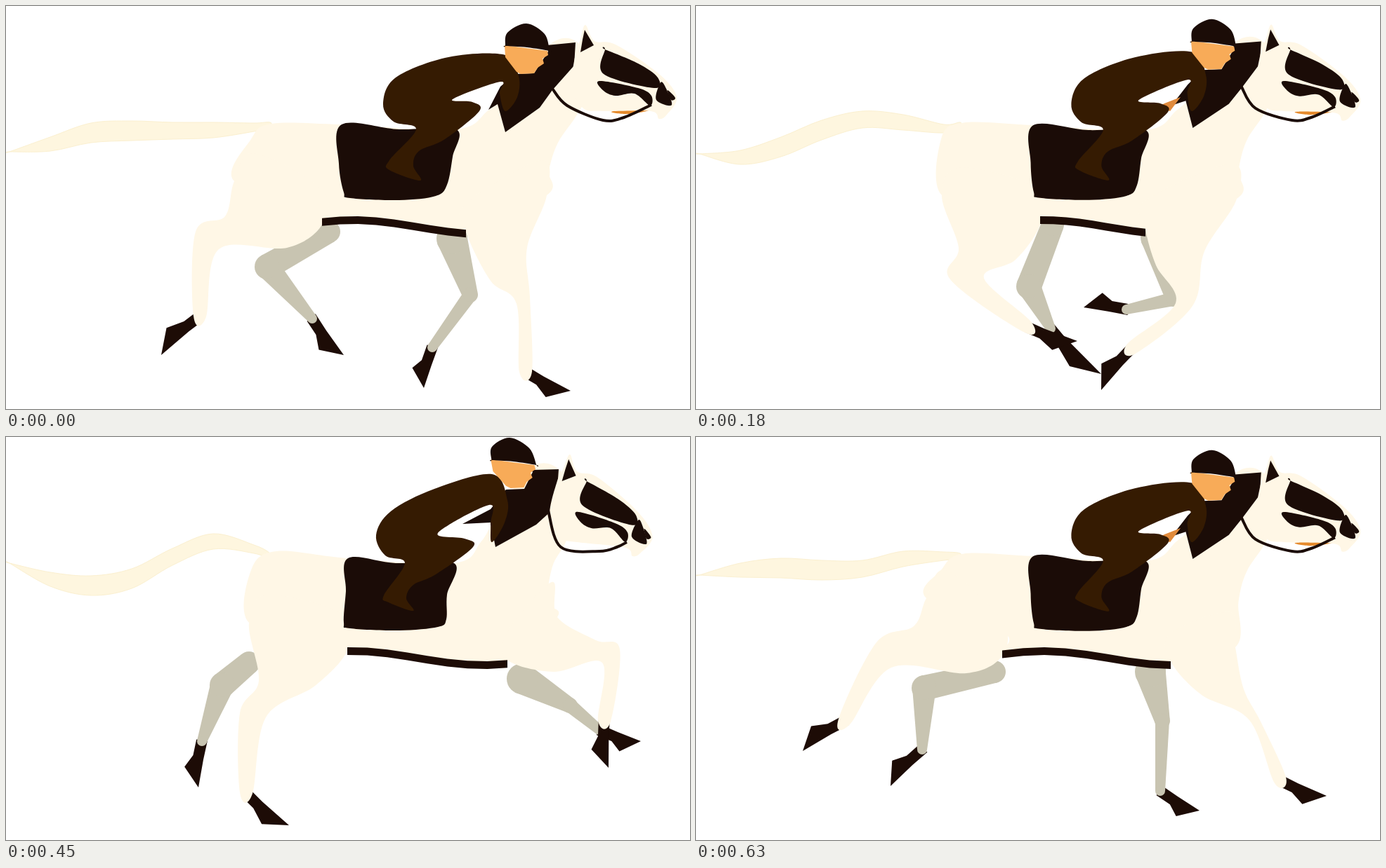
These frames come from a looping animation (974 px wide and 575 px high, 720 ms). An HTML page with a canvas:

```html
<!DOCTYPE html>
<html lang="en">
<head>
<meta charset="utf-8">
<title>Galloping horse</title>
<style>
html, body { margin: 0; width: 100%; height: 100%; overflow: hidden; background: #fff; }
canvas { display: block; width: 974px; height: 575px; }
</style>
</head>
<body>
<canvas id="stage" width="974" height="575"></canvas>
<script>
const ctx = document.getElementById('stage').getContext('2d');
const CREAM = '#fff7e6', PALE = '#fef6df', EDGE = '#fbf0d0', GREY = '#c8c4b1';
const DARK = '#1d0c06', BROWN = '#351b02', SKIN = '#f8ab58', BLACK = '#1b0c07';

const pts = s => s.trim().split(/\s+/).map(p => p.split(',').map(Number));
const mix = (a, b, k) => a.map((p, i) => p.map((v, j) => v + (b[i][j] - v) * k));

// Gait: eight steps through six key poses; lift is how far the rider has risen
const STEP = 90;
const GAIT = [0, .5, 1, 2, 2.5, 3, 4, 5];
const LIFT = [0, 0, .26, .64, 1, 1, .64, .26];

// Near legs: front edge down to the knee, fetlock, back edge up, then the toe
const nearHind = [
  '450,312 400,345 303,347 276,443 270,322 312,300 325,250 221,498',
  '490,312 455,362 410,388 472,458 362,390 374,345 350,270 543,478',
  '522,305 500,358 483,405 521,499 441,400 430,342 360,288 586,544',
  '486,305 440,355 370,400 342,508 333,394 360,348 346,265 403,554',
  '455,310 405,350 303,360 255,447 272,330 322,303 331,258 252,522',
  '436,312 385,337 278,329 211,406 257,293 310,270 328,230 152,448'
].map(pts);
const nearFore = [
  '770,270 742,345 746,415 740,522 727,425 690,392 655,322 804,549',
  '770,275 724,350 707,428 620,489 683,424 655,370 640,318 577,548',
  '773,270 747,350 752,428 643,444 716,415 685,375 658,320 577,444',
  '785,257 840,290 874,303 852,405 849,322 780,335 714,318 858,472',
  '778,290 825,345 862,378 903,422 838,378 755,362 692,320 974,438',
  '768,300 780,360 805,408 832,490 788,404 720,368 676,320 898,512'
].map(pts);

// Far legs: top, knee, fetlock, toe
const farHind = [
  '460,322 372,372 436,446 481,498', '508,312 474,400 505,460 577,525',
  '415,342 405,392 414,499 470,543', '346,322 308,354 279,434 274,500',
  '310,298 280,335 246,398 193,438', '425,335 325,358 322,446 277,498'
].map(pts);
const farFore = [
  '635,332 661,412 607,487 595,545', '655,330 680,418 613,433 552,430',
  '752,325 784,354 728,414 689,416', '735,345 803,383 845,418 904,434',
  '672,338 745,394 771,478 832,494', '647,335 664,405 661,505 717,533'
].map(pts);

// Tail heights from tip to root, at even distances
const tail = [
  [208, 197, 181, 178, 178, 177, 173], [211, 216, 201, 177, 162, 166, 175],
  [201, 218, 212, 183, 156, 155, 171], [180, 203, 212, 202, 171, 149, 160],
  [183, 190, 200, 200, 185, 160, 158], [197, 190, 187, 190, 188, 174, 170]
].map(ys => ys.map((y, i) => [5 + 58 * i, y]));
const TAIL_WIDTH = [0, 10, 14, 14, 12, 11, 6];

// Shapes with a low and a raised form
const back = [
  '378,168 478,169 640,176 688,148 735,110 774,55 811,50 840,100 815,152 786,195 773,235',
  '385,163 487,173 638,180 676,150 700,110 747,44 787,46 815,100 797,150 778,185 771,235'
].map(pts);
const saddle = [
  '478,169 560,176 641,176 636,215 628,255 612,271 560,277 490,274 481,266 474,225',
  '487,173 555,180 638,180 628,225 627,260 615,271 560,276 490,273 481,265 484,220'
].map(pts);
const mane = [
  '770,56 811,52 809,85 778,120 760,145 711,180 700,140 687,148 704,115 725,97 752,96 772,65',
  '748,47 787,46 785,75 777,105 755,125 697,157 690,122 650,124 690,103 712,75 738,74 750,50'
].map(pts);
const torso = [
  '711,70 630,73 555,102 537,140 552,165 584,176 546,220 546,234 590,249 580,228 588,207 625,190 674,150 664,137 636,133 704,108 703,125 711,150 728,130 730,100',
  '692,53 610,74 548,106 527,140 540,169 568,180 538,226 545,236 580,248 570,230 580,211 612,196 665,157 653,145 615,137 688,97 690,125 692,150 710,122 714,90'
].map(pts);
const rein = ['778,118 799,142 850,163 880,159 919,141', '772,105 790,157 845,163 870,157 884,150'].map(pts);

const face = pts('710,56 771,64 772,70 764,75 766,82 757,88 752,96 733,97 727,94 711,73');
const hat = pts('711,57 711,57 714,38 741,25 767,40 774,64 774,64 742,59');
const skull = pts('811,68 818,48 825,27 838,50 868,55 930,97 955,130 941,155 930,161 918,150 850,150 822,146 806,115');
const ear = pts('824,34 837,56 818,66 821,48');
const marks = [
  '853,62 853,62 900,82 928,102 923,117 851,97',
  '845,107 900,117 919,128 917,142 895,125 868,128 851,121',
  '931,111 937,112 948,141 926,134',
  '942,120 953,131 947,134'
].map(pts);

// Smooth curve through the points
function trace(list, closed = true) {
  const n = list.length;
  const at = i => closed ? list[(i + n) % n] : list[Math.max(0, Math.min(n - 1, i))];
  ctx.beginPath();
  ctx.moveTo(...list[0]);
  for (let i = 0; i < (closed ? n : n - 1); i++) {
    const [a, b, c, d] = [at(i - 1), at(i), at(i + 1), at(i + 2)];
    ctx.bezierCurveTo(b[0] + (c[0] - a[0]) / 6, b[1] + (c[1] - a[1]) / 6,
                      c[0] - (d[0] - b[0]) / 6, c[1] - (d[1] - b[1]) / 6, c[0], c[1]);
  }
}

function blob(list, color) {
  trace(list);
  ctx.fillStyle = color;
  ctx.fill();
}

function poly(list, color) {
  ctx.beginPath();
  list.forEach(p => ctx.lineTo(...p));
  ctx.closePath();
  ctx.fillStyle = color;
  ctx.fill();
}

// Unit vector from a to b, and the distance
function aim(a, b) {
  const dx = b[0] - a[0], dy = b[1] - a[1], len = Math.hypot(dx, dy) || 1;
  return [dx / len, dy / len, len];
}

function hoof(ankle, toe) {
  const [ux, uy, dist] = aim(ankle, toe), len = Math.max(58, dist);
  const shape = [[-2, -8], [26, -4], [len, 0], [len * .58, 22], [21, 11], [-2, 8]];
  poly(shape.map(([u, v]) => [ankle[0] + ux * u - uy * v, ankle[1] + uy * u + ux * v]), DARK);
}

function taper(a, b, ra, rb) {
  const [ux, uy] = aim(a, b);
  const side = (p, r) => [p[0] - uy * r, p[1] + ux * r];
  poly([side(a, ra), side(b, rb), side(b, -rb), side(a, -ra)], GREY);
  [[a, ra], [b, rb]].forEach(([p, r]) => {
    ctx.beginPath();
    ctx.arc(...p, r, 0, 7);
    ctx.fill();
  });
}

function farLeg([top, knee, ankle, toe], rTop, rKnee) {
  hoof(ankle, toe);
  taper(top, knee, rTop, rKnee);
  taper(knee, ankle, rKnee - 1, 7);
}

function nearLeg(leg, inFront, inBack) {
  const [top, front, kneeF, ankle, kneeB, rear, end, toe] = leg;
  const [ux, uy] = aim([(kneeF[0] + kneeB[0]) / 2, (kneeF[1] + kneeB[1]) / 2], ankle);
  const turn = -uy * (kneeF[0] - kneeB[0]) + ux * (kneeF[1] - kneeB[1]) > 0 ? 9 : -9;
  const side = s => [ankle[0] - uy * s, ankle[1] + ux * s];
  hoof(ankle, toe);
  blob([[top[0] + inFront, top[1] - 50], top, front, kneeF, side(turn), side(-turn),
        kneeB, rear, end, [end[0] + inBack, end[1] - 40]], CREAM);
}

const belly = x => 310 + 10 * Math.sin((x - 587) / 185 * Math.PI);
function bellyLine(from, to, drop) {
  return Array.from({ length: 9 }, (_, i) => {
    const x = from + (to - from) * i / 8;
    return [x, belly(x) + drop];
  });
}

function drawTail(spine) {
  const edge = s => spine.map(([x, y], i) => [x, y + s * TAIL_WIDTH[i]]);
  blob([...edge(-1), [376, 166], [376, 174], ...edge(1).reverse()], PALE);
  ctx.strokeStyle = EDGE;
  ctx.lineWidth = 1;
  ctx.stroke();
}

function drawHead(k) {
  ctx.save();
  ctx.translate(825 - 22 * k, 27 - 2 * k);
  ctx.rotate(k * 6.5 * Math.PI / 180);
  ctx.translate(-825, -27);
  if (k < .5) blob(pts('862,151 890,147 915,149 885,154'), '#e58a2c');
  blob(skull, CREAM);
  poly(ear, BLACK);
  marks.forEach(m => blob(m, BLACK));
  ctx.restore();
}

function drawRiderHead(k) {
  ctx.save();
  ctx.transform(1, 0, .13 * k, 1, -27 * k, -24 * k);
  poly(face, SKIN);
  blob(hat, BLACK);
  ctx.restore();
}

function draw(step) {
  const g = GAIT[step], k = LIFT[step];
  const pose = table => mix(table[Math.floor(g)], table[Math.ceil(g)], g % 1);
  const hind = pose(nearHind), fore = pose(nearFore);
  const flank = hind[0][0], rump = hind[6], chest = fore[0], elbow = fore[6][0];
  ctx.fillStyle = '#fff';
  ctx.fillRect(0, 0, 974, 575);

  farLeg(pose(farHind), 16, 18);
  farLeg(pose(farFore), 22, 11);
  drawTail(pose(tail));
  blob([...mix(...back, k), chest, ...bellyLine(elbow, flank, 2), [440, 280], rump, [349, 190]], CREAM);
  nearLeg(hind, 0, 28);
  nearLeg(fore, -8, 0);
  poly([...bellyLine(flank, elbow, 0), ...bellyLine(elbow, flank, 11)], DARK);

  blob(mix(...saddle, k), BLACK);
  poly(mix(...mane, k), BLACK);
  drawHead(k);
  trace(mix(...rein, k), false);
  ctx.strokeStyle = BLACK;
  ctx.lineWidth = 4;
  ctx.stroke();
  if (k > 0 && k < 1) poly(pts('658,144 667,139 690,130 675,150'), '#e08a3c');
  blob(mix(...torso, k), BROWN);
  drawRiderHead(k);
}

const start = performance.now();
let shown = -1;
function tick() {
  const step = Math.floor((performance.now() - start) / STEP) % GAIT.length;
  if (step !== shown) draw(shown = step);
  requestAnimationFrame(tick);
}
tick();
</script>
</body>
</html>
```
